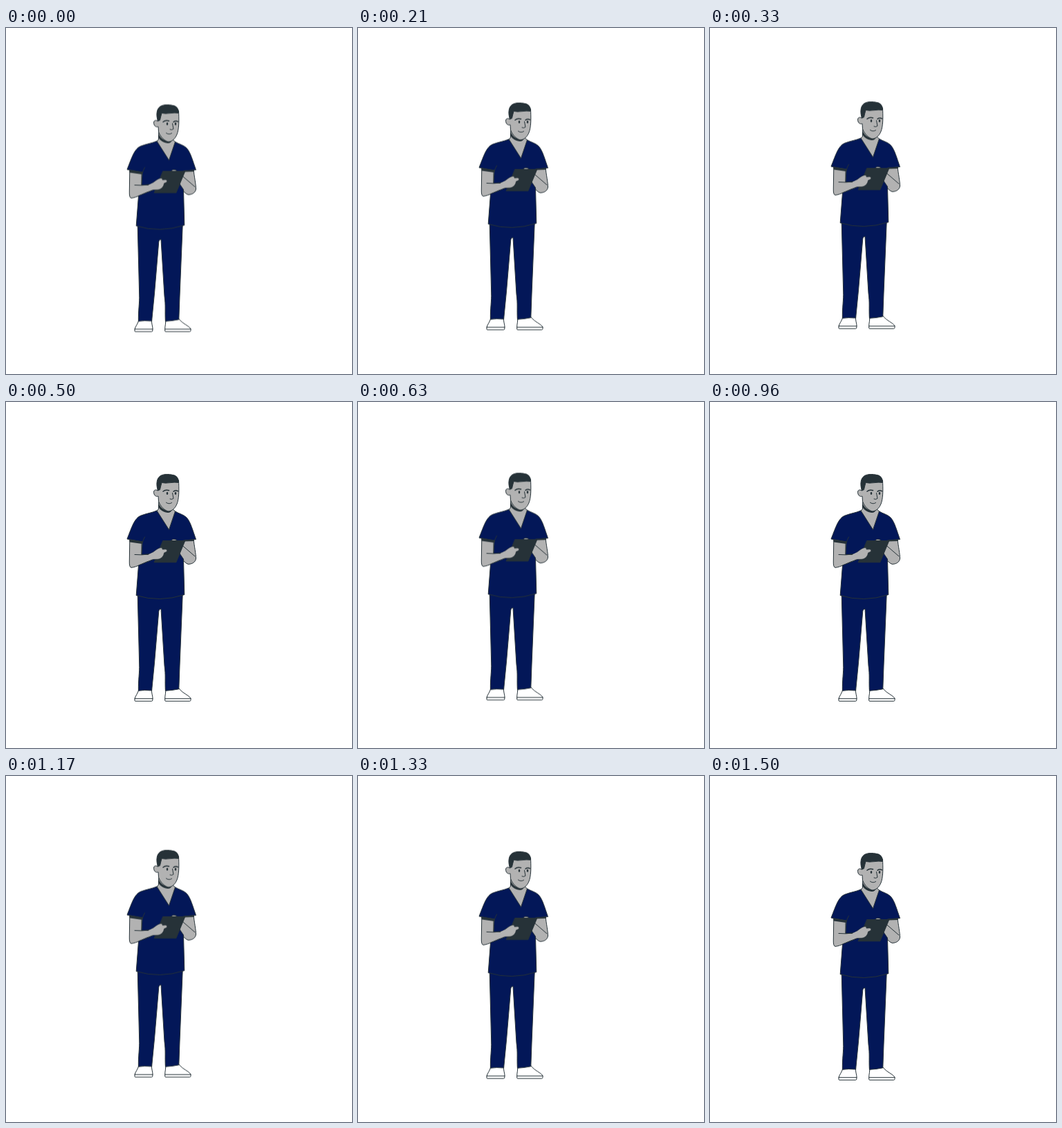
These frames come from a looping animation (500 by 500 pixels, 1540 ms). An HTML page without scripts:

```html
<!DOCTYPE html>
<html lang="en">
<head>
<meta charset="utf-8">
<title>Floating nurse</title>
<style>
  html, body { margin: 0; width: 100%; height: 100%; overflow: hidden; background: #fff; }
  svg { display: block; width: 100%; height: 100%; }
  .figure {
    stroke: #263238; stroke-width: 1; stroke-linecap: round; stroke-linejoin: round;
    animation: float 1540ms linear -40ms infinite;
  }
  .cloth { fill: #031758; }
  .skin { fill: #b2b2b2; }
  .dark { fill: #263238; }
  .shoe { fill: #fff; }
  .line { fill: none; }
  @keyframes float { 50% { transform: translateY(-10px); } }
</style>
</head>
<body>
<svg viewBox="0 0 500 500">
  <g class="figure">
    <g class="shoe">
      <path d="M192 422C191 428 186.500 432 186 436V438.300Q186 439.300 187 439.300H210.500Q211.700 439.300 211.800 438L212 435C212 431 210 428 210.500 422Z"/>
      <path d="M230.500 421C231.500 427 229.500 431 229.700 435.500V438.300Q229.700 439.300 231 439.300H265.500Q267 439.300 267 437.500V435.500C265 431 255 428 250 421Z"/>
      <path d="M186 435.700H212M229.700 435.700H267"/>
    </g>
    <path class="cloth" d="M190.200 285L192.700 386C193.200 398 191 408 191.400 424.300Q200 422.800 210.600 424L214.500 384L220.800 309Q221.500 306 224 306L229 388C231 402 229.500 410 230.400 424.300Q240 423.800 249.800 421.800L251 388L255.200 285Z"/>

    <path class="skin" d="M178.800 206L178.300 237Q178 246 181 246.300C188 246 202 238 212 234.500L223 234L233 221L225 217C218 218 213 225 207 227L196 227.500V206Z"/>
    <path class="skin" d="M255 205H271C272 215 274.600 227 274.500 233C274 239 268 241.500 263 241.300C257 239 252 230 246 225Z"/>

    <path class="cloth" d="M218 164C211 167 201 168.500 194 171.500C185.500 175.500 182 187 175 205L197 209L196 227.500L207 227L213 234.500L191.500 243L188.200 286.500Q222 297 257.800 285.500L256.500 234L249 223L258 207L274.500 205.500C270 193 267 181 261.500 174.500C257 169.500 250 168.500 244.500 165Z"/>
    <path class="dark" stroke="none" d="M178 205.500L197.500 208.500L196.500 212L179 209.500ZM256 206.500L272 205.500L271.500 208L257 208.500Z"/>
    <path class="line" d="M200.500 202Q198 206 197 211"/>
    <path class="line" d="M186 227.500Q196 228.500 207 227M254.500 214L273 230"/>

    <path class="skin" d="M221 146L220.300 162L218 164L235.500 191.500L244.500 165L240 161Z"/>
    <path class="dark" stroke="none" d="M220.300 153C222.500 159 228 163 234 164.500L240.500 161.500Q238.500 167.300 233.500 167C226 166 221.500 162 220 157.500Z"/>

    <path class="skin" d="M219.500 135C214.500 132 212.500 136 214 140C215 143 218 144 220 143L220.500 150.500C223 158 230 164.500 235 165C241.500 164.300 246 158.500 248 151.500C250.300 143 250 132 249.500 120L224 119Z"/>
    <path class="dark" d="M219.300 134.500C217 127 217.500 119.500 221 115.500C225 111.200 232 111 239 112Q250 113 249.300 123.500C241 122 233 125.500 225 123.500Q223.500 129 222.500 133.500Z"/>
    <g class="line">
      <path stroke-width="1.500" d="M227 136.200Q230.500 133 235.500 134.800M242 136.300Q245 134 248.700 135.800"/>
      <path d="M240.500 138.500L242 146.300Q240 148.500 237 147.100M231.500 152.300Q235.500 155.300 239.500 152.600"/>
    </g>
    <g class="dark" stroke="none">
      <ellipse cx="233" cy="139" rx="1.300" ry="2.100"/>
      <ellipse cx="245" cy="139" rx="1.300" ry="2.100"/>
    </g>

    <path class="skin" d="M237 209C240 205 243 204 247 207L250 210Z"/>
    <path class="dark" d="M227 207.500H258.800L245.800 238.700H214.500Z"/>
    <path class="skin" stroke-width=".7" d="M207 227C213 225 218 218 224 217.500Q227 218 226 220L231 219.700Q234 221 232 223.500L228.500 225C228 230 224 234 219 234.300L211 234.500Z"/>
    <path class="skin" stroke="none" d="M206 227.300L212 224.500L213 233.800L205 236.700Z"/>
  </g>
</svg>
</body>
</html>
```
